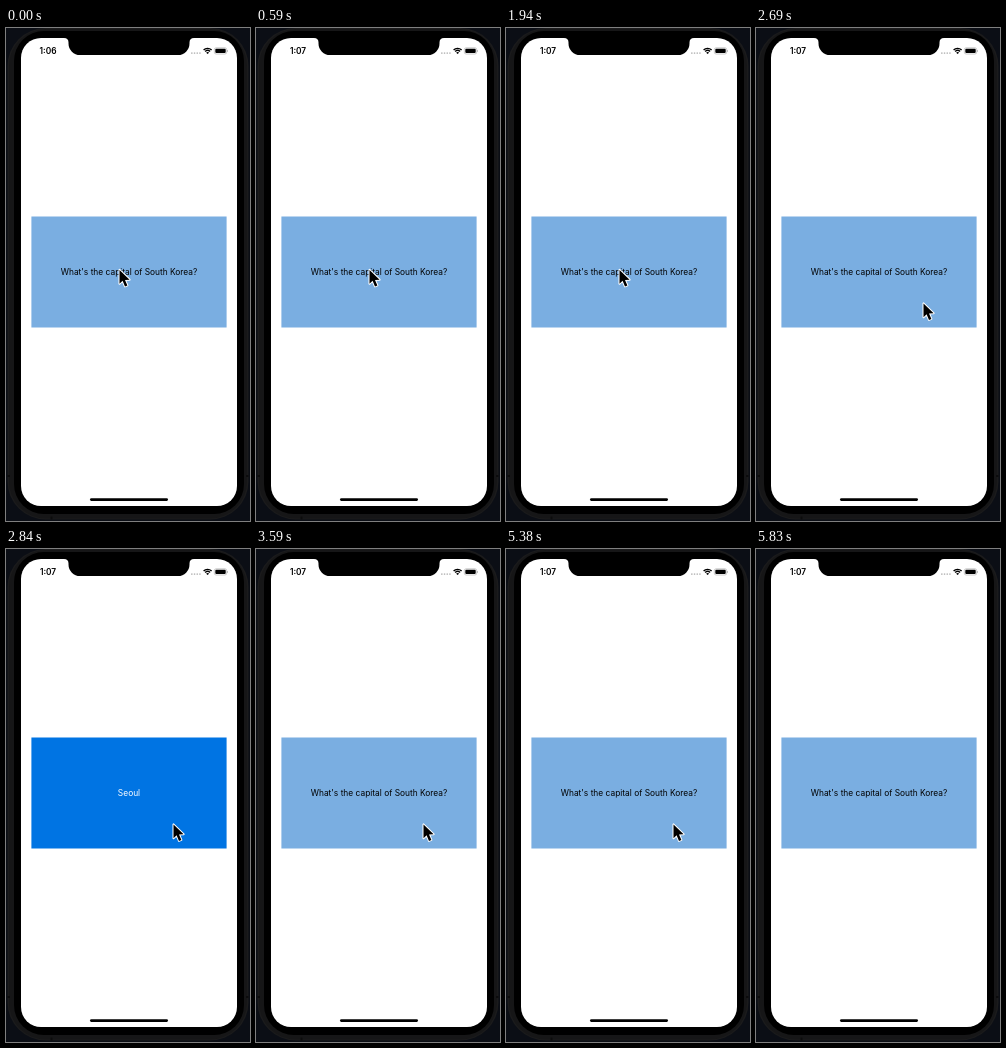
Recreate the animation shown at these times as an HTML page with a canvas. Size 244x493 px, loop 6130 ms.

```html
<!DOCTYPE html>
<html lang="en">
<head>
<meta charset="utf-8">
<title>Flashcard</title>
<style>
html, body { margin: 0; width: 100%; height: 100%; overflow: hidden; background: #0b0e15; }
canvas { display: block; width: 244px; height: 493px; }
</style>
</head>
<body>
<canvas id="stage"></canvas>
<script>
const W = 244, H = 493, LOOP = 6130;
const canvas = document.getElementById('stage');
const ctx = canvas.getContext('2d');
const ratio = window.devicePixelRatio || 1;
canvas.width = W * ratio;
canvas.height = H * ratio;

// Each entry: start time in ms, then the value held from there on
const clock = [[0, '1:06'], [590, '1:07']];
const flipped = [[0, false], [1040, true], [1940, false], [2840, true],
  [3590, false], [4490, true], [5380, false]];
const pointer = [[0, [112, 240.5]], [2240, [128, 242]], [2390, [162, 256]],
  [2540, [166, 271]], [2690, [166, 274]], [5680, [187, 376]], [5830, null]];

function valueAt(steps, t) {
  let value = steps[0][1];
  for (const [start, next] of steps) if (t >= start) value = next;
  return value;
}

function box(x, y, w, h, r, color) {
  ctx.fillStyle = color;
  ctx.beginPath();
  ctx.roundRect(x, y, w, h, r);
  ctx.fill();
}

function label(text, x, y, font, color) {
  ctx.font = font + ' Inter, sans-serif';
  ctx.textAlign = 'center';
  ctx.textBaseline = 'alphabetic';
  ctx.fillStyle = color;
  ctx.fillText(text, x, y);
}

function drawPhone() {
  box(0, 0, W, H, 0, '#0b0e15');
  box(1.5, 0, 241, 491.5, 38, '#1b1b1c');
  box(3, 1, 238, 489.5, 37, '#161617');
  box(8, 3, 230, 483, 30, '#000');
  for (const x of [1.5, 240]) box(x, 447, 2.5, 2, 0, '#0c0c0d');
  box(44.5, 488.5, 2, 3, 0, '#0c0c0d');
  box(15, 10, 216, 468, 20, '#fff');
  box(84, 470.3, 78, 2.6, 1.3, '#000');
}

function drawNotch() {
  ctx.fillStyle = '#000';
  ctx.beginPath();
  ctx.moveTo(58, 9);
  ctx.lineTo(58, 10);
  ctx.quadraticCurveTo(62.5, 10, 62.5, 14.5);
  ctx.arcTo(62.5, 27, 75, 27, 11.5);
  ctx.arcTo(183.5, 27, 183.5, 14.5, 11.5);
  ctx.lineTo(183.5, 14.5);
  ctx.quadraticCurveTo(183.5, 10, 188, 10);
  ctx.lineTo(188, 9);
  ctx.fill();
}

function drawStatus(time) {
  label(time, 42, 26, '600 8.3px', '#000');

  for (let i = 0; i < 4; i++) box(185 + i * 2.7, 24.2, 1.7, 1.7, 0.85, '#b9b9b9');

  ctx.strokeStyle = '#000';
  ctx.lineWidth = 1.3;
  for (const r of [5.5, 3.4]) {
    ctx.beginPath();
    ctx.arc(201.6, 25.8, r, -Math.PI * 0.76, -Math.PI * 0.24);
    ctx.stroke();
  }
  ctx.fillStyle = '#000';
  ctx.beginPath();
  ctx.moveTo(201.6, 26);
  ctx.arc(201.6, 26, 2, -Math.PI * 0.76, -Math.PI * 0.24);
  ctx.fill();

  ctx.strokeStyle = '#a6a6a6';
  ctx.lineWidth = 0.6;
  ctx.beginPath();
  ctx.roundRect(208.3, 19.8, 12.4, 6.2, 1.8);
  ctx.stroke();
  box(209.3, 20.8, 10.4, 4.2, 1, '#000');
  box(221.2, 21.9, 0.8, 2, 0.4, '#a6a6a6');
}

function drawCard(isFlipped) {
  box(25.4, 188.5, 195.2, 111, 0, isFlipped ? '#0074e3' : '#7aaee1');
  if (isFlipped) label('Seoul', 123, 247, '8.4px', '#fff');
  else label("What's the capital of South Korea?", 123, 247, '8.4px', '#000');
}

function drawPointer([x, y]) {
  const outline = [[1.5, 1.4], [1.5, 15.2], [4.6, 12.3], [7, 17.9],
    [9.4, 16.9], [7, 11.5], [11.6, 11.3]];
  ctx.save();
  ctx.translate(x, y);
  ctx.beginPath();
  for (const [px, py] of outline) ctx.lineTo(px, py);
  ctx.closePath();
  ctx.lineJoin = 'round';
  ctx.lineWidth = 2;
  ctx.strokeStyle = '#fff';
  ctx.stroke();
  ctx.fillStyle = '#000';
  ctx.fill();
  ctx.restore();
}

function render(t) {
  ctx.setTransform(ratio, 0, 0, ratio, 0, 0);
  drawPhone();
  drawNotch();
  drawStatus(valueAt(clock, t));
  drawCard(valueAt(flipped, t));
  const spot = valueAt(pointer, t);
  if (spot) drawPointer(spot);
}

const begin = performance.now();
function tick() {
  render((performance.now() - begin) % LOOP);
  requestAnimationFrame(tick);
}
tick();
</script>
</body>
</html>
```
